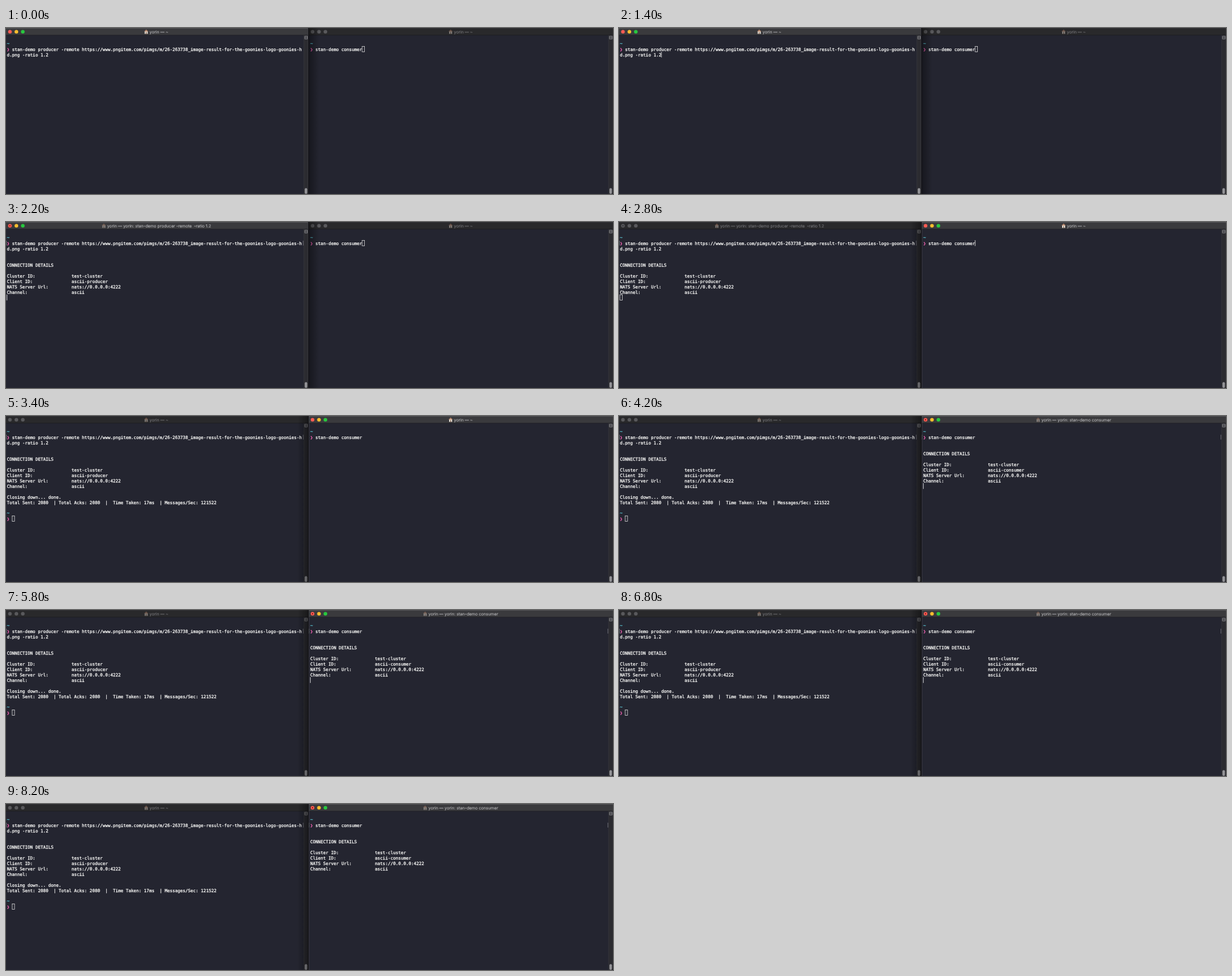
Write an HTML page that moves like this. It is 1000 by 275 pixels and loops after 8600 ms.

```html
<!DOCTYPE html>
<html lang="en">
<head>
<meta charset="utf-8">
<style>
html, body { margin: 0; width: 100%; height: 100%; overflow: hidden; background: #242530; }
svg { display: block; width: 1000px; height: 275px; }
text {
  white-space: pre; text-rendering: geometricPrecision;
  font: 7.087px "DejaVu Sans Mono", monospace; stroke-width: .28px;
}
.title { font: 6.75px Inter, sans-serif; stroke-width: .1px; }
</style>
</head>
<body>
<svg id="stage" viewBox="0 0 1000 275"></svg>
<script>
const LOOP = 8600, CELL = 4.267, ROW = 9, EDGE = 498, USER = "yorin";
const stage = document.getElementById("stage");

const rect = (x, y, w, h, fill, extra = "") =>
  `<rect x="${x}" y="${y}" width="${w}" height="${h}" fill="${fill}" ${extra}/>`;
const dot = (x, y, r, fill) => `<circle cx="${x}" cy="${y}" r="${r}" fill="${fill}"/>`;
const text = (x, y, s, fill = "#fafaf8", name = "") =>
  `<text x="${x}" y="${y}" class="${name}" fill="${fill}" stroke="${fill}">${s}</text>`;

const details = role => [
  "CONNECTION DETAILS", "",
  "Cluster ID:".padEnd(25) + "test-cluster",
  "Client ID:".padEnd(25) + "ascii-" + role,
  "NATS Server Url:".padEnd(25) + "nats://0.0.0.0:4222",
  "Channel:".padEnd(25) + "ascii"
];
const producer = [
  "~",
  "❯ stan-demo producer -remote https://www.pngitem.com/pimgs/m/26-263738_image-result-for-the-goonies-logo-goonies-h",
  "d.png -ratio 1.2"
];
const sending = [...producer, "", "", ...details("producer")];
const finished = [
  ...sending, "", "Closing down... done.",
  "Total Sent: 2080  | Total Acks: 2080  |  Time Taken: 17ms  | Messages/Sec: 121522",
  "", "~", "❯ "
];
const consumer = ["~", "❯ stan-demo consumer"];
const receiving = [...consumer, "", "", ...details("consumer")];

// Rows are centred on y = 26, 35, 44, ...
function line(x, s, i) {
  const y = 28.6 + i * ROW;
  if (s === "~") return text(x, y - 1, s, "#63dcea");
  if (s[0] === "❯") return text(x, y, "❯", "#f564b4") + text(x + 2 * CELL, y, s.slice(2));
  return s && text(x, y, s);
}

function cursor(x, { col, row, type }) {
  const cx = x + col * CELL, y = 21.2 + row * ROW;
  if (type === "box") return rect(cx + .1, y + .3, 3.9, 8.9, "none", 'stroke="#d8d8d8" stroke-width=".8"');
  return type === "bar" ? rect(cx - .4, y, 1, 9.6, "#c8c8ca") : "";
}

const house = (x, dim) => `<g opacity="${dim ? .45 : 1}">
  <path d="M${x + 1} 5.5h5v4.2h-5z" fill="#ece6dc"/>
  <path d="M${x} 6l3.5-3.6 3.5 3.6z" fill="#b98a70"/>
  <path d="M${x + 2.8} 7h1.5v2.7h-1.5z" fill="#7d5a48"/></g>`;

// Scroll track, split button and thumb
const scrollbar = right => rect(right - 7.4, 12, 7.4, 263, "#2b2b30")
  + rect(right - 7.4, 12, .6, 263, "#3c3c42")
  + `<path d="M${right - 5.8} 13.6h4.4v4.6h-4.4zM${right - 5.8} 15.9h4.4" fill="none" stroke="#a2a2a6" stroke-width=".7"/>`
  + rect(right - 5.9, 265.3, 4.2, 9.4, "#949498", 'rx="2"');

function pane(w) {
  const { left, right, active } = w;
  const width = right - left, x = left ? left + 2.8 : 1.5;
  const lights = active ? ["#ff5b53", "#f9bd2e", "#28c73f"] : Array(3).fill("#59595c");
  let out = rect(left, 0, width, 275, "#242530")
    + rect(left, 0, width, 12, active ? "#3a3a3d" : "#29292b")
    + rect(left, 0, width, .6, active ? "#66666a" : "#3a3a3c")
    + rect(left, 11.6, width, .6, "#16161a")
    + scrollbar(right);
  lights.forEach((c, i) => out += dot(left + 6.5 + i * 10.6, 6.3, 3, c));
  if (w.edited) out += dot(left + 6.5, 6.3, 1.1, active ? "#7c1510" : "#29292b");
  out += house(w.iconX, w.dim || !active)
    + text(w.iconX + 9, 8.5, `${USER} — ${w.title}`, active ? "#b9b9bb" : "#77777a", "title");
  if (w.marked) {
    out += rect(left + .2, 31, .7, 8, "#85858c") + rect(right - 8.6, 31, .7, 8, "#85858c");
  }
  return out + w.lines.map((s, i) => line(x, s, i)).join("") + cursor(x, w.cursor);
}

const within = (t, a, b) => t >= a && t < b;

function producerPane(t) {
  const running = within(t, 2000, 3400), active = t < 2800;
  const at = t < 2000 ? { col: 16, row: 2 } : running ? { col: 0, row: 11 } : { col: 2, row: 16 };
  const lit = within(t, 400, 1000) || t >= 1400;
  return pane({
    left: 0, right: EDGE, active,
    lines: t < 2000 ? producer : running ? sending : finished,
    title: running ? USER + ": stan-demo producer -remote  -ratio 1.2" : "~",
    iconX: running ? 157.7 : 227.5,
    edited: within(t, 2200, 3400), dim: t >= 2200, marked: t >= 2000,
    cursor: { ...at, type: !active ? "box" : lit ? "bar" : "" }
  });
}

function consumerPane(t) {
  const active = t >= 2800, running = t >= 4000, output = t >= 4200;
  const at = output ? { col: 0, row: 10 } : running ? { col: 0, row: 2 } : { col: 20, row: 1 };
  const off = [[3200, 3800], [5200, 5800], [6200, 6800], [7200, 7800], [8200, LOOP]]
    .some(([a, b]) => within(t, a, b));
  return pane({
    left: EDGE + .5, right: 1000, active,
    lines: output ? receiving : consumer,
    title: running ? USER + ": stan-demo consumer" : "~",
    iconX: running ? 687 : 729,
    edited: output, dim: output, marked: running,
    cursor: { ...at, type: !active ? "box" : off ? "" : "bar" }
  });
}

// The front window casts a soft shadow on its neighbour.
function border(t) {
  const front = t < 2800, x = front ? EDGE : EDGE - 18;
  return `<linearGradient id="shade" x1="${front ? 0 : 1}" x2="${front ? 1 : 0}">
    <stop stop-opacity=".4"/><stop offset="1" stop-opacity="0"/></linearGradient>`
    + rect(x, 0, 18, 275, "url(#shade)")
    + rect(front ? EDGE - 1 : EDGE + .6, 0, .7, 275, "#5a5a5f")
    + rect(EDGE - .3, 0, .9, 275, "#0c0c10");
}

let shown = -1;
function draw() {
  const t = performance.now() % LOOP;
  const step = Math.floor(t / 200);
  if (step !== shown) {
    shown = step;
    stage.innerHTML = producerPane(t) + consumerPane(t) + border(t);
  }
  requestAnimationFrame(draw);
}
draw();
</script>
</body>
</html>
```
